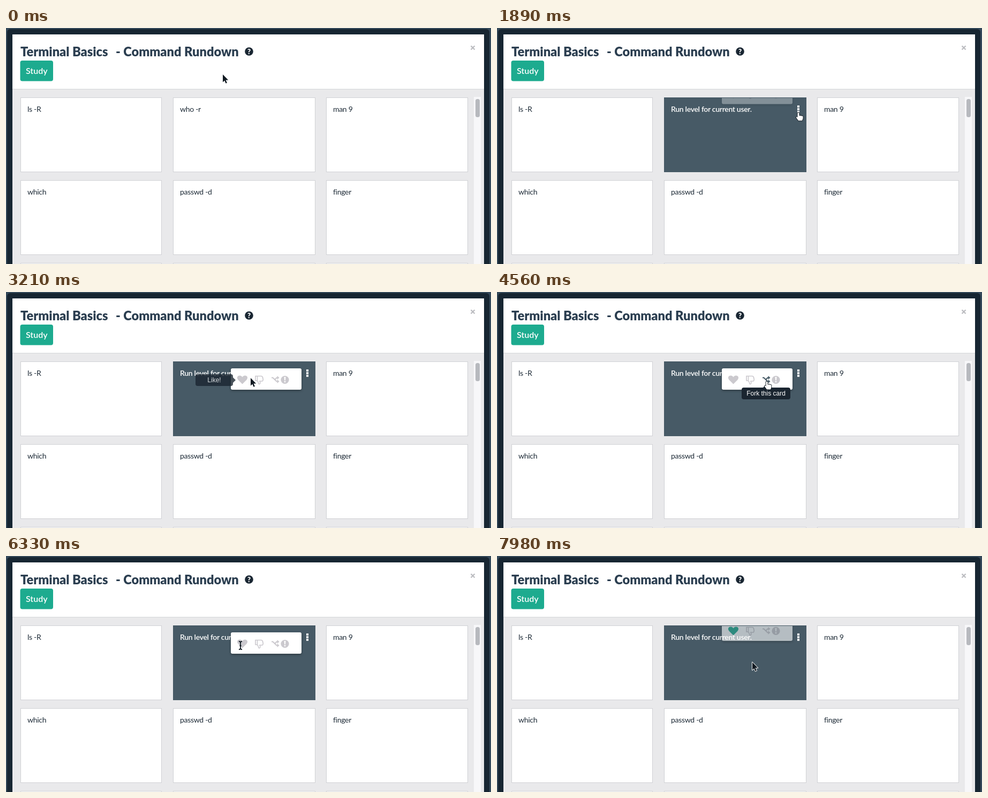
These frames come from a looping animation (906 px wide and 442 px high, 8000 ms). An HTML page:

```html
<!DOCTYPE html>
<html lang="en">
<head>
<meta charset="utf-8">
<title>Flash cards</title>
<style>
html, body { margin: 0; width: 100%; height: 100%; overflow: hidden; background: #34495a; }
body { position: relative; font: 14px/20px Lato, sans-serif; letter-spacing: -.3px; color: #1d2a36; }
svg, .card, .tip { position: absolute; }
svg { left: 0; top: 0; overflow: visible; letter-spacing: 0; }
.card { height: 140px; box-sizing: border-box; padding: 11px 12px;
  background: #fff; border: 1px solid #d0d1d5; overflow: hidden; white-space: nowrap; }
#back { left: 312px; top: 130px; width: 266px; background: #475a66; border-color: #475a66;
  color: #fff; font-weight: 600; }
#menu { position: absolute; left: 107px; top: 12px; width: 132px; height: 40px;
  background: #fff; border-radius: 3px; box-shadow: 0 2px 4px rgba(0,0,0,.35); }
#menu g { color: #cbc9ce; }
#cursor { paint-order: stroke; stroke-width: 1.8; stroke-linejoin: round; }
.tip { height: 22px; border-radius: 4px; background: #1a2530; color: #fff; text-align: center;
  font: 12px/22px "Liberation Sans", Arial, sans-serif; letter-spacing: 0; }
.tip::after { content: ""; position: absolute; border: 5px solid transparent; }
.side { width: 70px; top: 154px; }
.side::after { left: 100%; top: 6px; border-left-color: #1a2530; }
.below::after { left: 40px; bottom: 100%; border-bottom-color: #1a2530; }
</style>
</head>
<body>
<svg width="906" height="442">
  <rect x="2" y="2" width="901" height="460" rx="6" fill="#172632"/>
  <path fill="#fff" d="M12 12h881v430h-881z"/>
  <path fill="#e9e9eb" d="M12 114h881v328h-881z"/>
  <path fill="#d5d6d9" d="M12 114h881v1h-881z"/>
  <path fill="#f7f7f9" d="M874 129h13v313h-13z"/>
  <rect x="877" y="133" width="8" height="34" rx="3.5" fill="#b7b9be"/>
  <g font-size="23.6" font-weight="900" fill="#2b3e50">
    <text x="27" y="53">Terminal Basics</text>
    <text x="205" y="53">- Command Rundown</text>
  </g>
  <circle cx="454" cy="44" r="7.8" fill="#1a2733"/>
  <text x="454" y="48.8" font-size="13" font-weight="900" fill="#fff" text-anchor="middle">?</text>
  <path d="M868.5 33.5l7 7m0-7l-7 7" stroke="#bcbdc1" stroke-width="2.4"/>
  <rect x="26.5" y="61" width="61.5" height="38.5" rx="4" fill="#1dab8f"/>
  <text x="37" y="86" font-size="16" font-weight="600" fill="#fff">Study</text>
</svg>

<div class="card" id="back">Run level for current user.
  <svg width="265" height="140"><path fill="#fff" d="M248 14h4v4h-4zm0 5h4v4h-4zm0 5h4v4h-4z"/></svg>
  <div id="menu"><svg width="132" height="40">
    <g><path fill="currentColor" d="M21.5 29.5L13.5 21.5C10 17 13 13.5 16.5 13.5C19 13.5 21 15 21.5 16.5C22 15 24 13.5 26.5 13.5C30 13.5 33 17 29.5 21.5Z"/></g>
    <g fill="none" stroke="currentColor" stroke-width="1.6"><path d="M46 14.5h3.5v8.5h-3.5zM49.5 14.5h7q2.5 0 2.5 2q1.5 1 .7 2.7q1.3 1.2 .3 2.8q0 2-2 2h-4q1.5 3 .3 5q-1.5 1.2-2.5-.5q0-3-2.8-5.3"/></g>
    <g fill="none" stroke="currentColor" stroke-width="2"><path d="M76 17.5h2.5l7 7h1.5M81.5 22l4-4.5h1.5"/><path fill="currentColor" stroke="none" d="M86.5 14l4 3.5-4 3.5zm0 7l4 3.5-4 3.5z"/></g>
    <g><circle cx="101" cy="21.5" r="7.6" fill="currentColor"/><path fill="#fff" d="M99.6 16h2.8l-.5 6.4h-1.8zm.2 7.8h2.4v2.4h-2.4z"/></g>
  </svg></div>
</div>

<div class="tip side" id="like" style="left:354px">Like!</div>
<div class="tip side" id="dislike" style="left:384px">Dislike</div>
<div class="tip below" id="fork" style="left:457px;top:179px;width:91px">Fork this card</div>
<svg width="906" height="442"><path id="cursor"/></svg>

<script>
const $ = id => document.getElementById(id);
const back = $('back'), menu = $('menu'), cursor = $('cursor');
const icons = menu.querySelectorAll('g');
const iconX = [441, 473, 503, 521];

const columns = [[27, 264], [312, 266], [598, 265]];   // left, width
const labels = ['ls -R', 'who -r', 'man 9', 'which', 'passwd -d', 'finger', '', '', ''];
const cards = labels.map((label, i) => {
  const card = document.createElement('div');
  const [left, width] = columns[i % 3];
  card.className = 'card';
  card.textContent = label;
  card.style.left = left + 'px';
  card.style.width = width + 'px';
  card.style.top = 130 + 155 * Math.floor(i / 3) + 'px';
  back.before(card);
  return card;
});
const front = cards[1];

// shape, fill, stroke
const shapes = {
  arrow: ['M0 1v14.5l3.3-3 2.3 5.2 2.3-1-2.3-5.1h4.6z', '#111a22', '#fff'],
  hand: ['M-1.5 1.5q1.5-2 3 0v5q1.2-1.2 2.6 0q1.4-.8 2.4.4q1.8-.5 2 1.2v3.4l-1.5 4h-7l-4-5.5q-.6-2 1.5-1.6l1 1z', '#fff', '#111a22'],
  beam: ['M-3-7q3 0 3 2q0-2 3-2M0-5v11M-3 8q3 0 3-2q0 2 3 2M-1.5 1h3', 'none', '#111a22']
};

// time, x, y, pointer shape from then on
const path = [
  [0, 405, 86, 'arrow'], [30, 405, 86, 'arrow'], [520, 440, 206, 'arrow'],
  [1200, 440, 206, 'arrow'], [1560, 563, 158, 'hand'], [2400, 563, 158, 'arrow'],
  [2880, 441, 163, 'hand'], [3120, 441, 163, 'arrow'], [3210, 457, 160, 'arrow'],
  [3400, 473, 165, 'hand'], [4140, 473, 165, 'arrow'], [4350, 504, 167, 'hand'],
  [4980, 504, 167, 'arrow'], [5350, 434, 168, 'beam'], [5450, 434, 168, 'arrow'],
  [5700, 521, 166, 'hand'], [5910, 521, 166, 'arrow'], [6300, 438, 167, 'beam'],
  [6500, 438, 167, 'beam'], [6640, 442, 165, 'hand'], [7500, 442, 165, 'arrow'],
  [7860, 477, 198, 'arrow'], [8000, 477, 198, 'arrow']
];

const ramp = (t, start, length) => Math.min(1, Math.max(0, (t - start) / length));
const smooth = u => u * u * (3 - 2 * u);
const shown = (t, on, off) => ramp(t, on, 150) * (1 - ramp(t, off, 150));

// the CSS "ease" curve
function ease(x) {
  if (x <= 0 || x >= 1) return x;
  let lo = 0, hi = 1, s;
  for (let i = 0; i < 20; i++) {
    s = (lo + hi) / 2;
    if (.75 * s * (1 - s) + s ** 3 < x) lo = s; else hi = s;
  }
  return .3 * s * (1 - s) ** 2 + 3 * s * s * (1 - s) + s ** 3;
}

function turn(face, angle) {
  face.style.visibility = Math.abs(angle) < 90 ? 'visible' : 'hidden';
  face.style.transform = angle ? `perspective(1070px) rotateX(${angle}deg)` : 'none';
}

function draw(t) {
  const angle = 180 * ease(ramp(t, 551, 600));
  turn(front, angle);
  turn(back, angle - 180);

  const open = ease(ramp(t, 1827, 300)) - ease(ramp(t, 7907, 300));
  menu.style.opacity = open;
  menu.style.transform = `translateY(${-60 * (1 - open)}px)`;

  $('like').style.opacity = shown(t, 2850, 3180) + shown(t, 6640, 7520);
  $('dislike').style.opacity = shown(t, 3400, 4160);
  $('fork').style.opacity = shown(t, 4360, 5000);

  const i = path.findIndex(key => key[0] > t) - 1;
  const [t0, x0, y0, kind] = path[i], [t1, x1, y1] = path[i + 1];
  const u = smooth((t - t0) / (t1 - t0));
  const x = x0 + (x1 - x0) * u, y = y0 + (y1 - y0) * u;
  const [d, fill, stroke] = shapes[kind];
  cursor.setAttribute('d', d);
  cursor.setAttribute('fill', fill);
  cursor.setAttribute('stroke', stroke);
  cursor.setAttribute('transform', `translate(${x} ${y})`);

  icons.forEach((icon, n) => {
    const hover = kind === 'hand' && Math.abs(x - iconX[n]) < 8;
    icon.style.color = n === 0 && t >= 6750 ? '#1dab8f' : hover ? '#475a66' : '';
  });
}

function tick() {
  draw(performance.now() % 8000);
  requestAnimationFrame(tick);
}
tick();
</script>
</body>
</html>
```
